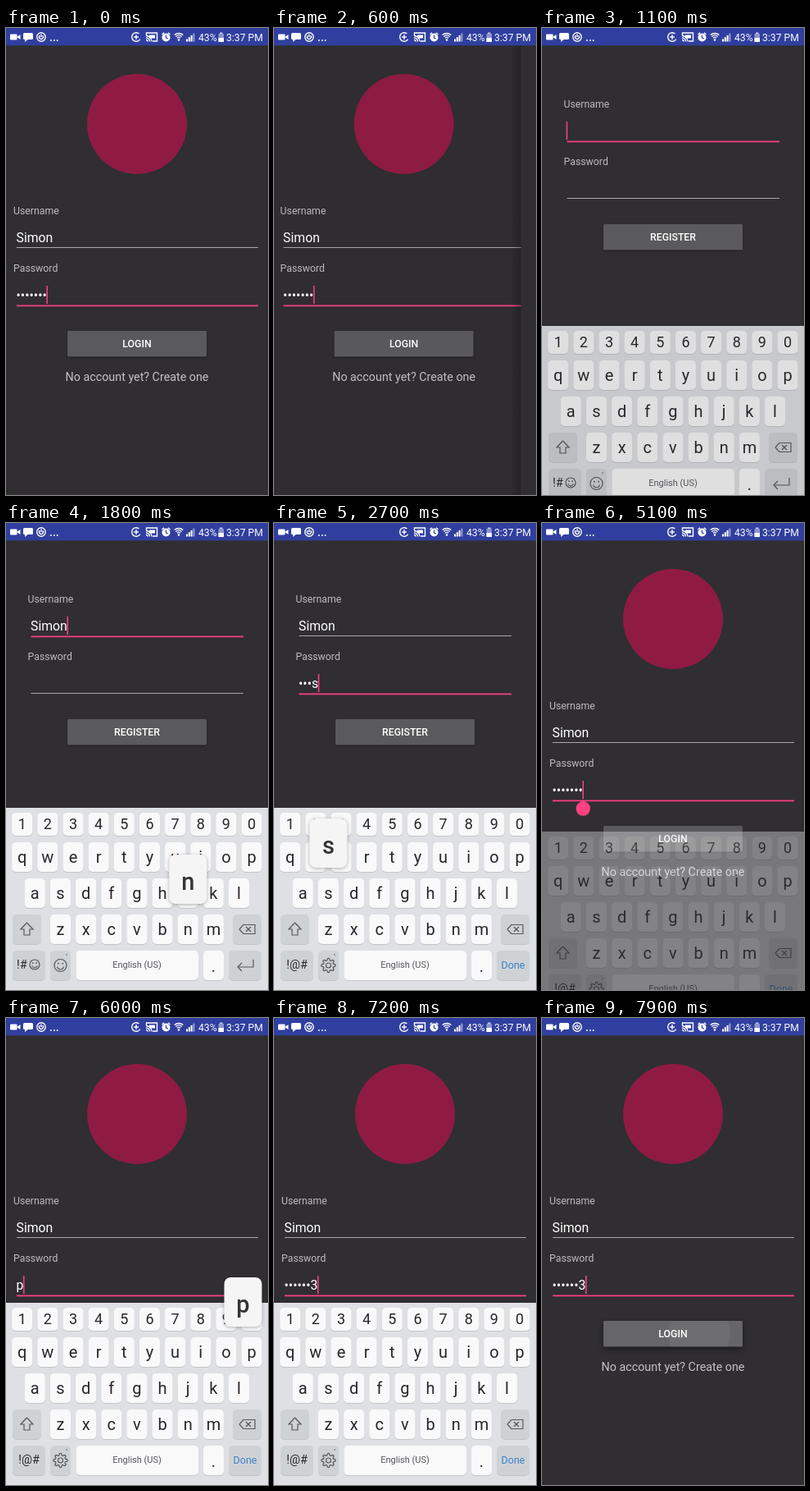
Write an HTML page with a canvas that moves like this. It is 320x569 px and loops after 8 s.

```html
<!DOCTYPE html>
<html lang="en">
<head>
<meta charset="utf-8">
<title>Login flow</title>
<style>
html, body { margin: 0; width: 100%; height: 100%; overflow: hidden; background: #302e31; }
canvas { display: block; width: 320px; height: 569px; }
</style>
</head>
<body>
<canvas id="stage"></canvas>
<script>
const W = 320, H = 569, LOOP = 8000;
const PINK = '#f5407f', BG = '#302e31';
const NAME = 'Simon', PASS = 'pass123';
const dpr = window.devicePixelRatio || 1;

function sized(canvas) {
  canvas.width = W * dpr;
  canvas.height = H * dpr;
  return canvas.getContext('2d');
}
const stage = sized(document.getElementById('stage'));
const layer = sized(document.createElement('canvas'));
let ctx = stage;

const clamp = (v, a = 0, b = 1) => Math.min(b, Math.max(a, v));
const ramp = (t, start, dur) => clamp((t - start) / dur);
const smooth = p => p * p * (3 - 2 * p);

// Typing schedule: [time, character]
const every = (text, start, gap) => [...text].map((c, i) => [start + i * gap, c]);
const nameKeys = every(NAME, 1250, 110);
const regKeys = [2140, 2330, 2520, 2680, 2900, 3150, 3400].map((t, i) => [t, PASS[i]]);
const loginKeys = every(PASS, 5950, 170);
const allKeys = [...nameKeys, ...regKeys, ...loginKeys];

function text(s, x, y, size, color, opt = {}) {
  ctx.font = `${opt.weight || 400} ${size}px Roboto, "Noto Sans", sans-serif`;
  ctx.textAlign = opt.align || 'left';
  ctx.fillStyle = color;
  ctx.fillText(s, x, y);
  return ctx.measureText(s).width;
}

function rect(x, y, w, h, color) {
  ctx.fillStyle = color;
  ctx.fillRect(x, y, w, h);
}

function round(x, y, w, h, r, color) {
  ctx.beginPath();
  ctx.roundRect(x, y, w, h, r);
  ctx.fillStyle = color;
  ctx.fill();
}

function disc(x, y, r, color) {
  ctx.beginPath();
  ctx.arc(x, y, r, 0, Math.PI * 2);
  ctx.fillStyle = color;
  ctx.fill();
}

function arc(x, y, r, a = 0, b = Math.PI * 2) {
  ctx.beginPath();
  ctx.arc(x, y, r, a, b);
  ctx.stroke();
}

function poly(points, fill) {
  ctx.beginPath();
  points.forEach(([x, y], i) => i ? ctx.lineTo(x, y) : ctx.moveTo(x, y));
  fill ? ctx.fill() : ctx.stroke();
}

function masked(keys, t) {
  const done = keys.filter(k => k[0] <= t);
  if (!done.length) return '';
  const [when, last] = done[done.length - 1];
  return '•'.repeat(done.length - 1) + (t - when < 1500 ? last : '•');
}

function field(label, value, x, y, width, focused) {
  text(label, x, y, 12.3, '#bdbcbd');
  const w = text(value, x + 3.5, y + 34, 15.8, '#fff');
  if (focused) {
    rect(x + 4, y + 40.5, width, 1.8, PINK);
    rect(x + 3.1 + w, y + 17, 1.6, 22, PINK);
  } else {
    rect(x + 4, y + 40, width, 1, '#a9a8a9');
  }
}

function button(label, y, press, cx) {
  ctx.save();
  ctx.shadowColor = 'rgba(0,0,0,.45)';
  ctx.shadowBlur = (2 + 5 * clamp(press * 3)) * dpr;
  ctx.shadowOffsetY = (1 + 2 * clamp(press * 3)) * dpr;
  round(75, y, 170, 31.5, 1.5, '#5a595b');
  ctx.restore();
  if (press > 0) {
    ctx.save();
    ctx.beginPath();
    ctx.rect(75, y, 170, 31.5);
    ctx.clip();
    rect(75, y, 170, 32, `rgba(255,255,255,${0.07 * clamp(press * 3)})`);
    disc(cx, y + 16, 8 + 75 * press, 'rgba(255,255,255,.05)');
    ctx.restore();
  }
  text(label, 160, y + 20.4, 12.3, '#fff', { weight: 500, align: 'center' });
}

function loginScreen(t) {
  rect(0, 0, W, H, BG);
  disc(160, 117, 61, '#8f1b43');
  const left = 7 - Math.floor(clamp((t - 5280) / 70, 0, 7));
  const pass = t < 5900 ? '•'.repeat(left) : masked(loginKeys, t);
  field('Username', NAME, 9, 227, 295, false);
  field('Password', pass, 9, 297, 295, true);
  if (t > 4980 && t < 5300) {
    disc(50.2, 348, 8.7, '#ff4081');
    poly([[50.2, 337.5], [43.2, 343.5], [57.2, 343.5]], true);
  }
  button('LOGIN', 369, ramp(t, 7700, 500), 192);
  text('No account yet? Create one', 160, 430, 14.3, '#c4c3c4', { align: 'center' });
}

function registerScreen(t) {
  rect(0, 0, W, H, BG);
  const onPass = t >= 1950;
  const name = nameKeys.filter(k => k[0] <= t).map(k => k[1]).join('');
  field('Username', name, 26.5, 97, 259.5, !onPass);
  field('Password', masked(regKeys, t), 26.5, 167, 259.5, onPass);
  button('REGISTER', 239, ramp(t, 3900, 350), 160);
}

const rows = [
  { keys: '1234567890', x: 19.7, y: 367, h: 28, size: 18 },
  { keys: 'qwertyuiop', x: 19.7, y: 407, h: 36, size: 20 },
  { keys: 'asdfghjkl', x: 35.3, y: 451, h: 36, size: 20 },
  { keys: 'zxcvbnm', x: 66.5, y: 495, h: 36, size: 20 }
];
const PITCH = 31.15, INK = '#262729', GREY = '#cfd2d5', WHITE = '#f9f9fa';

function keyCap(x, y, w, h, color) {
  round(x, y + 1, w, h, 5, '#c3c6c9');
  round(x, y, w, h, 5, color);
}

function face(x, y, r) {
  arc(x, y, r);
  arc(x, y + r * 0.1, r * 0.55, 0.2, Math.PI - 0.2);
  disc(x - r * 0.35, y - r * 0.3, 0.9, '#55575a');
  disc(x + r * 0.35, y - r * 0.3, 0.9, '#55575a');
}

function gear(x, y) {
  ctx.beginPath();
  for (let i = 0; i <= 64; i++) {
    const a = i / 64 * Math.PI * 2;
    const r = 7.4 + 1.2 * Math.tanh(3 * Math.cos(a * 8));
    ctx.lineTo(x + r * Math.cos(a), y + r * Math.sin(a));
  }
  ctx.stroke();
  arc(x, y, 3);
}

function keyPanel(passMode) {
  rect(0, 347, W, 222, '#dee0e3');
  for (const row of rows) {
    [...row.keys].forEach((c, i) => {
      const x = row.x + i * PITCH;
      keyCap(x - 12.5, row.y - row.h / 2, 25, row.h, WHITE);
      text(c, x, row.y + row.size * 0.34, row.size, INK, { align: 'center' });
    });
  }
  keyCap(8, 477, 35, 36, GREY);
  keyCap(277, 477, 35, 36, GREY);
  keyCap(8, 521, 40, 36, GREY);
  keyCap(54, 521, 25, 36, GREY);
  keyCap(85.5, 521, 149.5, 36, WHITE);
  keyCap(241, 521, 25, 36, WHITE);
  keyCap(272, 521, 40, 36, GREY);

  ctx.strokeStyle = '#55575a';
  ctx.lineWidth = 1.2;
  poly([[25.5, 487], [33, 495], [29, 495], [29, 502], [22, 502], [22, 495], [18, 495], [25.5, 487]]);
  poly([[285, 495], [290, 489.5], [304, 489.5], [304, 500.5], [290, 500.5], [285, 495]]);
  poly([[293, 492], [299, 498]]);
  poly([[299, 492], [293, 498]]);
  text('English (US)', 160, 542, 11, '#55575a', { align: 'center' });
  text('.', 253.5, 547, 20, INK, { align: 'center' });
  disc(74, 526, 1, '#8a8c8f');
  if (passMode) {
    text('!@#', 28, 543, 14.5, INK, { align: 'center' });
    gear(66.5, 539);
    text('Done', 292, 543, 12.5, '#3d83c6', { align: 'center' });
  } else {
    text('!#', 13, 543, 14.5, INK);
    face(35, 538, 6);
    face(66.5, 539, 7.5);
    poly([[302, 532], [302, 541], [283, 541]]);
    poly([[288, 536], [283, 541], [288, 546]]);
  }
}

// The panel is drawn on its own layer so that it fades as one piece.
function keyboard(t, p, passMode) {
  if (p <= 0) return;
  ctx = layer;
  ctx.setTransform(dpr, 0, 0, dpr, 0, 0);
  ctx.clearRect(0, 0, W, H);
  keyPanel(passMode);
  ctx = stage;
  ctx.save();
  ctx.globalAlpha = clamp(1.45 * p);
  ctx.drawImage(layer.canvas, 0, Math.round(40 * (1 - p)), W, H);
  ctx.restore();

  const hit = allKeys.find(k => t >= k[0] && t < k[0] + 120);
  if (hit) popup(hit[1]);
}

function popup(c) {
  const key = c.toLowerCase();
  const row = rows.find(r => r.keys.includes(key));
  const x = clamp(row.x + row.keys.indexOf(key) * PITCH, 31.5, 289.5);
  ctx.save();
  ctx.shadowColor = 'rgba(0,0,0,.3)';
  ctx.shadowBlur = 4 * dpr;
  ctx.shadowOffsetY = dpr;
  round(x - 23, row.y - 91, 46, 60, 8, '#f5f5f6');
  ctx.restore();
  text(c, x, row.y - 48, 29, '#333436', { weight: 500, align: 'center' });
}

function statusBar() {
  rect(0, 0, W, 21.3, '#303f9f');
  ctx.strokeStyle = ctx.fillStyle = '#fff';
  ctx.lineWidth = 1.4;
  round(5, 7.5, 8.5, 7, 1, '#fff');
  poly([[13, 11], [17.5, 8], [17.5, 14]], true);
  round(21, 6, 12, 8, 1.5, '#fff');
  poly([[23, 13], [28, 13], [23, 17]], true);
  arc(43, 11, 5.2);
  arc(43, 11, 2.4, -0.8, Math.PI + 0.8);
  poly([[43, 7.5], [43, 11]]);
  text('...', 53, 16, 14, '#fff', { weight: 500 });

  arc(159, 11, 5.3, 0.5, 5.4);
  poly([[156, 11], [162, 11]]);
  poly([[159, 8], [159, 14]]);
  poly([[171.5, 9], [171.5, 6], [184.5, 6], [184.5, 16], [179, 16]]);
  for (const r of [2, 4.5, 7]) arc(171, 16.5, r, -Math.PI / 2, 0);
  rect(175, 8.5, 7, 4, '#fff');
  disc(195.5, 11.5, 5, '#fff');
  poly([[190.5, 8], [193, 5.8]]);
  poly([[200.5, 8], [198, 5.8]]);
  for (const r of [3, 5.5, 8]) arc(211, 14.5, r, -2.3, -0.84);
  disc(211, 14.5, 1.3, '#fff');
  for (let i = 0; i < 4; i++) {
    rect(220 + i * 2.8, 13.5 - i * 2.3, 2, 3 + i * 2.3, i < 3 ? '#fff' : 'rgba(255,255,255,.5)');
  }
  ctx.strokeStyle = '#303f9f';
  ctx.lineWidth = 1.2;
  poly([[195.5, 8.5], [195.5, 12], [198, 13]]);
  text('43%', 235, 15.8, 12.2, '#fff');
  rect(261, 5.5, 3.5, 1.5, '#c9cdec');
  rect(259.5, 7, 6.5, 10, '#8d95cc');
  rect(259.5, 12, 6.5, 5, '#fff');
  text('3:37 PM', 269, 15.8, 12.2, '#fff');
}

function draw(t) {
  ctx.setTransform(dpr, 0, 0, dpr, 0, 0);
  const cover = smooth(ramp(t, 550, 350)) - smooth(ramp(t, 4115, 350));
  if (cover < 1) {
    ctx.save();
    ctx.translate(-24 * cover, 0);
    loginScreen(t);
    ctx.restore();
    rect(0, 0, W, H, `rgba(0,0,0,${0.25 * cover})`);
  }
  if (cover > 0) {
    const x = W * (1 - cover);
    const shade = ctx.createLinearGradient(x - 12, 0, x, 0);
    shade.addColorStop(0, 'rgba(0,0,0,0)');
    shade.addColorStop(1, 'rgba(0,0,0,.25)');
    rect(x - 12, 0, 12, H, shade);
    ctx.save();
    ctx.translate(x, 0);
    registerScreen(t);
    ctx.restore();
  }
  const up = ramp(t, 950, 250) - ramp(t, 4350, 200) + ramp(t, 5030, 250) - ramp(t, 7330, 220);
  keyboard(t, up, t >= 1950);
  statusBar();
}

const start = performance.now();
function tick() {
  draw((performance.now() - start) % LOOP);
  requestAnimationFrame(tick);
}
tick();
</script>
</body>
</html>
```
